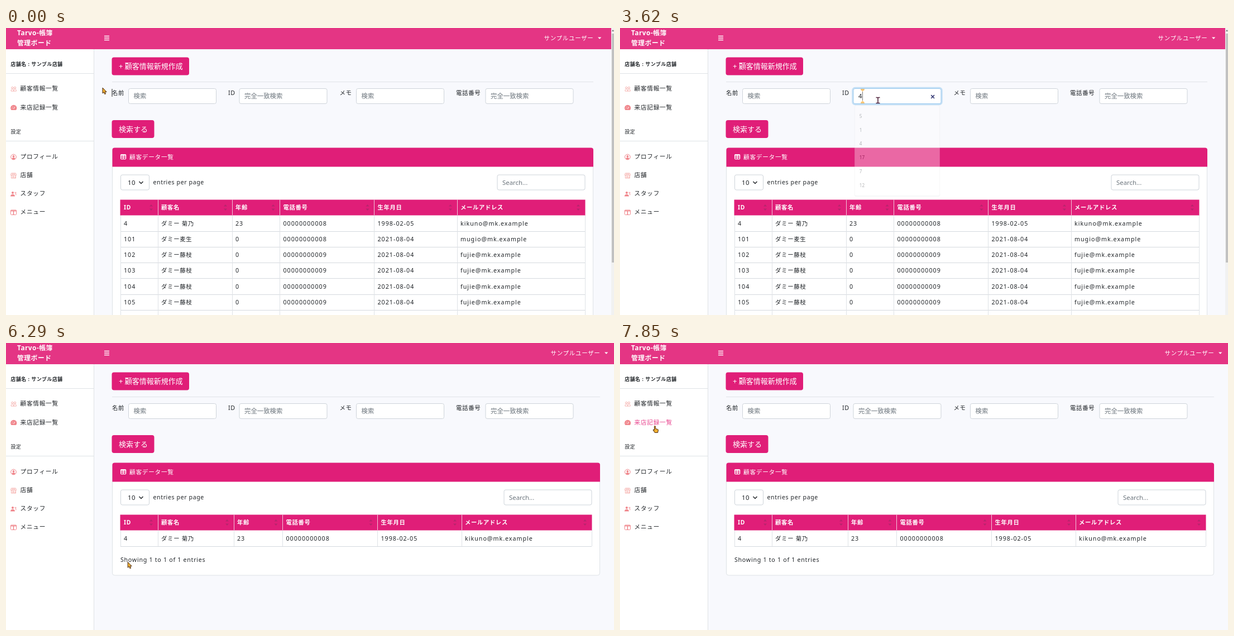
Recreate the animation shown at these times as an HTML page. Size 1089x514 px, loop 8 s.

```html
<!DOCTYPE html>
<html lang="ja">
<head>
<meta charset="utf-8">
<title>管理ボード</title>
<style>
html, body { margin: 0; width: 100%; height: 100%; overflow: hidden; background: #f8f9fd; }
svg { display: block; width: 100vw; height: 100vh; font-family: "Noto Sans", "Noto Sans CJK JP", sans-serif; }
text { white-space: pre; }
</style>
</head>
<body>
<svg viewBox="0 0 1089 514">
  <g id="narrow"></g>
  <g id="wide"></g>
  <g id="live"></g>
</svg>
<script>
const LOOP = 8000, RELOAD = 5290;
const PINK = '#e01e78', DARK = '#c51a69', INK = '#212529', GRAY = '#6c757d', LINE = '#dee2e6';
const $ = id => document.getElementById(id);
const clamp = v => Math.max(0, Math.min(1, v));

// Text is placed by its left edge and vertical centre.
const text = (x, cy, s, size = 10.4, fill = INK, weight = 400, gap = .7) =>
  `<text x="${x}" y="${cy + size * .37}" font-size="${size}" fill="${fill}" font-weight="${weight}" letter-spacing="${gap}">${s}</text>`;
const rect = (x, y, w, h, fill, r = 0, more = '') =>
  `<rect x="${x}" y="${y}" width="${w}" height="${h}" fill="${fill}" rx="${r}" ${more}/>`;
const path = (d, fill = 'none', stroke = 'none', width = 1) =>
  `<path d="${d}" fill="${fill}" stroke="${stroke}" stroke-width="${width}"/>`;
const at = (x, y, body) => `<g transform="translate(${x} ${y})">${body}</g>`;

const field = (x, y, s, w = 158, fill = GRAY, edge = '#ced4da') =>
  rect(x + .5, y + .5, w - 1, 27, '#fff', 3, `stroke="${edge}"`) + text(x + 9.5, y + 14, s, 11.4, fill, 400, 0);
const searchButton = fill => rect(189.5, 165, 76, 32, fill, 4) + text(202, 181, '検索する', 13, '#fff', 400, 0);

const SALMON = '#f0868c', PALE = '#f6b3b0';
const icons = {
  people: path('M1 9.5c0-5 5-5 5 0zM5.5 9.5c0-5 5-5 5 0z', 'none', PALE) +
    `<g fill="none" stroke="${PALE}"><circle cx="3.4" cy="3.6" r="1.7"/><circle cx="8" cy="3.6" r="1.7"/></g>`,
  gauge: path('M1.5 10A5.6 5.6 0 1 1 10 10Z', SALMON) + path('M5.5 8L8 4M2.5 6.5h1M4 3.5l.5 1', 'none', '#fff'),
  face: `<circle cx="5.5" cy="6" r="4.8" fill="none" stroke="${SALMON}"/><circle cx="5.5" cy="4.8" r="1.9" fill="${SALMON}"/>` +
    path('M2.3 9.3c1-3 5.4-3 6.4 0c-2 1.8-4.4 1.8-6.4 0', SALMON),
  shop: path('M1.5 1.5h8l1 3.5H.5zM1.5 5v5.5h8V5M3 7h3v2H3M8 7v3.5M3.5 1.5v3M5.5 1.5v3M7.5 1.5v3', 'none', PALE),
  staff: `<circle cx="4" cy="3.5" r="2" fill="${SALMON}"/>` + path('M0 10c0-5 8-5 8 0z', SALMON) +
    path('M7.5 3h3M8 5h2.5M9 7h1.5', 'none', SALMON),
  board: rect(.5, 1.5, 10, 8.5, 'none', 1, `stroke="${SALMON}"`) + path('M.5 3h10M5.5 3v7', 'none', SALMON, 1.6)
};
const menu = [['people', 108.5, '顧客情報一覧'], ['gauge', 142, '来店記録一覧'], ['face', 230, 'プロフィール'],
  ['shop', 263.5, '店舗'], ['staff', 296.5, 'スタッフ'], ['board', 329.5, 'メニュー']];
const link = (cy, s, fill) => text(25.5, cy, s, 10.7, fill);

const heads = ['ID', '顧客名', '年齢', '電話番号', '生年月日', 'メールアドレス'];
const people = [
  ['4', 'ダミー 菊乃', '23', '00000000008', '1998-02-05', 'kikuno@mk.example'],
  ['101', 'ダミー麦生', '0', '00000000008', '2021-08-04', 'mugio@mk.example'],
  ...[102, 103, 104, 105].map(id =>
    [id, 'ダミー藤枝', '0', '00000000009', '2021-08-04', 'fujie@mk.example'])
];

function table(cols, rows) {
  const left = cols[0], right = cols[6], bottom = rows.length > 1 ? 514 : 364;
  let out = '';
  rows.forEach((row, r) => {
    const y = 335.5 + r * 28.25;
    row.forEach((s, i) => out += text(cols[i] + 6, y + 14.2, s, i == 1 ? 10.4 : 10.7, INK, 400, i == 1 ? .7 : 1));
    out += rect(left, Math.round(y + 28), right - left, 1, '#d5d9de');
  });
  cols.forEach(x => out += rect(Math.floor(x), 335, 1, bottom - 335, LINE));
  out += rect(left - .5, 307.5, right - left + 1, 28, PINK);
  heads.forEach((h, i) => {
    if (i) out += rect(Math.floor(cols[i]), 307.5, 1, 28, '#f3c6da');
    out += text(cols[i] + 6, 321.5, h, 10.3, '#fff', 700) +
      at(cols[i + 1] - 12, 321.5, path('M-3-2l3-3.5l3 3.5zM-3 2l3 3.5l3-3.5z', '#b8246d'));
  });
  return out;
}

function page(extra, cols, rows) {
  const edge = 1052 + extra, cardEnd = rows.length > 1 ? 530 : 416;
  let out = rect(0, 0, 1089, 514, '#f8f9fd') + rect(0, 38, 157, 476, '#fff') + rect(157, 38, 1, 476, LINE) +
    rect(0, 0, 1089, 38, '#e43584') +
    text(20, 8.5, 'Tarvo-帳簿', 11.8, '#fff', 700, .5) + text(20, 26.5, '管理ボード', 11.8, '#fff', 700, .5) +
    path('M176 14.5h9M176 18h9M176 21.5h9', 'none', '#fff', 1.4) +
    text(963.5 + extra, 18, 'サンプルユーザー', 10.5, '#fff') + path(`M${1060 + extra} 16.5h6.4l-3.2 3.2z`, '#fff') +
    text(8.5, 65, '店舗名 : サンプル店舗', 8.8, INK, 700, .6) + rect(0, 81, 157, 1, LINE) +
    text(8.5, 185.5, '設定', 8.8, INK, 500) + rect(0, 202, 157, 1, LINE);
  for (const [icon, cy, s] of menu) out += at(8, cy - 5, icons[icon]) + link(cy, s, INK);

  out += rect(189.5, 52.5, 138.5, 32, PINK, 4) + text(202, 68.5, '+ 顧客情報新規作成', 13, '#fff', 400, 0) +
    rect(190, 96, edge - 190, 1, '#e1e3e8') +
    text(190, 116, '名前') + text(398, 116, 'ID', 10.7) + text(597.5, 116, 'メモ') + text(806, 116, '電話番号') +
    field(219, 108, '検索') + field(417.5, 108, '完全一致検索') + field(627, 108, '検索') + field(858.5, 108, '完全一致検索') +
    searchButton(PINK) +
    rect(190.5, 215, edge - 191, cardEnd - 215, '#fff', 4, `stroke="${LINE}"`) +
    path(`M190.5 248.5v-30q0-4 4-4H${edge - 4}q4 0 4 4v30z`, PINK) +
    rect(205.6, 226.6, 9, 8, 'none', 1, 'stroke="#fff" stroke-width="1.3"') +
    path('M205 228h10M205 231.2h10M210.1 227v8', 'none', '#fff', 1.3) +
    text(221, 231, '顧客データ一覧', 10.7, '#fff') +
    field(205, 262.5, '', 52) + text(218, 276.5, '10', 11.5, INK, 400, .4) +
    path('M238.5 275l3.5 3.5l3.5-3.5', 'none', INK, 1.5) +
    text(263.5, 276.5, 'entries per page', 10.6, INK, 400, .6) +
    field(879.5 + extra, 262.5, 'Search...') + table(cols, rows);

  return out + (rows.length > 1
    ? rect(1084, 0, 5, 514, '#f1f1f1') + rect(1085, 10, 4, 410, '#c1c1c1') + path('M1085 6l2-3l2 3z', '#777')
    : text(205, 388.5, 'Showing 1 to 1 of 1 entries', 10.7));
}

$('narrow').innerHTML = page(0, [205, 272, 405, 490.5, 659.5, 808, 1037], people);
$('wide').innerHTML = page(12, [205, 272, 408, 495.5, 665.5, 816, 1049], people.slice(0, 1));

const track = [[0, 173, 107], [1400, 173, 107], [1860, 462, 129.5], [3900, 462, 129.5], [4190, 335, 152],
  [4430, 246.5, 187], [5560, 246.5, 187], [5800, 232, 270], [6090, 216, 373], [6200, 213, 415], [6360, 222, 375],
  [6400, 222, 375], [6600, 330, 292], [6780, 388.8, 336], [6850, 392, 344], [7130, 392, 344], [7480, 215, 222],
  [7850, 62.5, 149], [LOOP, 62.5, 149]];

function pointer(t) {
  const i = track.findIndex(k => k[0] > t), [t0, x0, y0] = track[i - 1], [t1, x1, y1] = track[i];
  const p = (t - t0) / (t1 - t0);
  return [x0 + (x1 - x0) * p, y0 + (y1 - y0) * p];
}

const shapes = {
  arrow: path('M0 0v10l2.3-2l1.6 3.6l1.8-.8l-1.6-3.4h3z', '#f0b030', '#4a2a18', 1),
  beam: path('M-3.5-5h2.6q.9 0 .9 1V4q0 1-.9 1h-2.6M3.5-5H.9Q0-5 0-4V4q0 1 .9 1h2.6', 'none', '#50243c', 1.6),
  hand: path('M-1 0q1-1 2 0v4.5l4 1q1 .3 1 1.5l-.8 4.5h-5.4l-3-4.5q0-1.5 1.6-.6l.6.8z', '#f0b030', '#4a2a18', 1)
};

function suggestions(shown, scale) {
  let out = rect(417, 137, 159, 168, '#000', 4, 'opacity=".08"') +
    rect(417.5, 136, 158, 168, '#dcdee2', 3) + rect(418, 136.5, 157, 166.5, '#fff', 3);
  ['5', '1', '4', '17', '7', '12'].forEach((s, i) => out += text(426.5, 155.5 + i * 25.75, s, 8.4, INK, 500, 0));
  return `<g opacity="${shown}" transform="translate(496.5 221) scale(${scale}) translate(-496.5 -221)">${out}</g>`;
}

function live(t) {
  const [x, y] = pointer(t), loaded = t >= RELOAD;
  const inside = (l, top, w, h) => x >= l && x < l + w && y >= top && y < top + h;
  const onButton = inside(189.5, 165, 76, 32), onLink = inside(20, 134, 78, 17);
  const onHead = loaded && inside(205, 308, 844, 27.5);
  const onField = [219, 417.5, 627, 858.5].some(l => inside(l, 108, 158, 28));
  const caret = (cx, top, h, fill = '#222') => rect(cx, top, 1, h, fill);
  let out = '';

  if (t < 520 || t >= 1050 && t < 1790) out += caret(189.5, 109, 14);

  if (t >= 2060 && !loaded) {
    const typed = t >= 3480, focus = clamp((t - 2010) / 150) * clamp((4760 - t) / 130);
    out += rect(416.5, 107, 160, 30, 'none', 4.5, `stroke="#c3dff5" stroke-width="2.4" opacity="${focus}"`) +
      field(417.5, 108, typed ? '4' : '完全一致検索', 158, typed ? INK : GRAY, focus > .5 ? '#9ccbf0' : '#ced4da');
    if (t < 2610 || t >= 3150 && t < 3480) out += caret(427, 114, 16);
    if (typed && t < 4630) {
      if (t < 4010) out += caret(434, 114, 16, '#777');
      out += path('M431 109h7q0 3-2.5 3.5l-1 2l-1-2Q431 112 431 109zM431 135h7q0-3-2.5-3.5l-1-2l-1 2Q431 132 431 135z', '#f6c578') +
        path('M557.2 120.2l5.8 5.8M563 120.2l-5.8 5.8', 'none', '#3b3f78', 1.7);
    }
    const closing = clamp((t - 3480) / 210);
    if (closing < 1) out += suggestions(clamp((t - 2060) / 150) * (1 - closing), 1 - .05 * closing);
  }

  if (!loaded && onButton) {
    const ring = clamp((t - 4600) / 200);
    out += rect(188.3, 163.8, 78.4, 34.4, 'none', 5, `stroke="#ee96bd" stroke-width="2.6" opacity="${ring}"`) +
      searchButton(ring ? DARK : '#d01c70');
  }
  if (loaded && inside(205, 337, 844, 27)) out += rect(206, 336, 843, 27.5, '#000', 0, 'opacity=".075"');
  if (onHead && x > 272 && x < 408 || t > 6680 && t < 6850) out += rect(277.5, 313.5, 124, 16.5, '#fff', 0, 'opacity=".09"');
  if (onLink) out += rect(24, 134, 74, 16, '#fff') + link(142, '来店記録一覧', '#e8468f');

  const shape = onField ? 'beam' : onButton || onLink || onHead ? 'hand' : 'arrow';
  return out + at(x, y, shapes[shape]);
}

function draw(now) {
  const t = now % LOOP;
  $('wide').style.display = t < RELOAD ? 'none' : '';
  $('live').innerHTML = live(t);
  requestAnimationFrame(draw);
}
requestAnimationFrame(draw);
</script>
</body>
</html>
```
